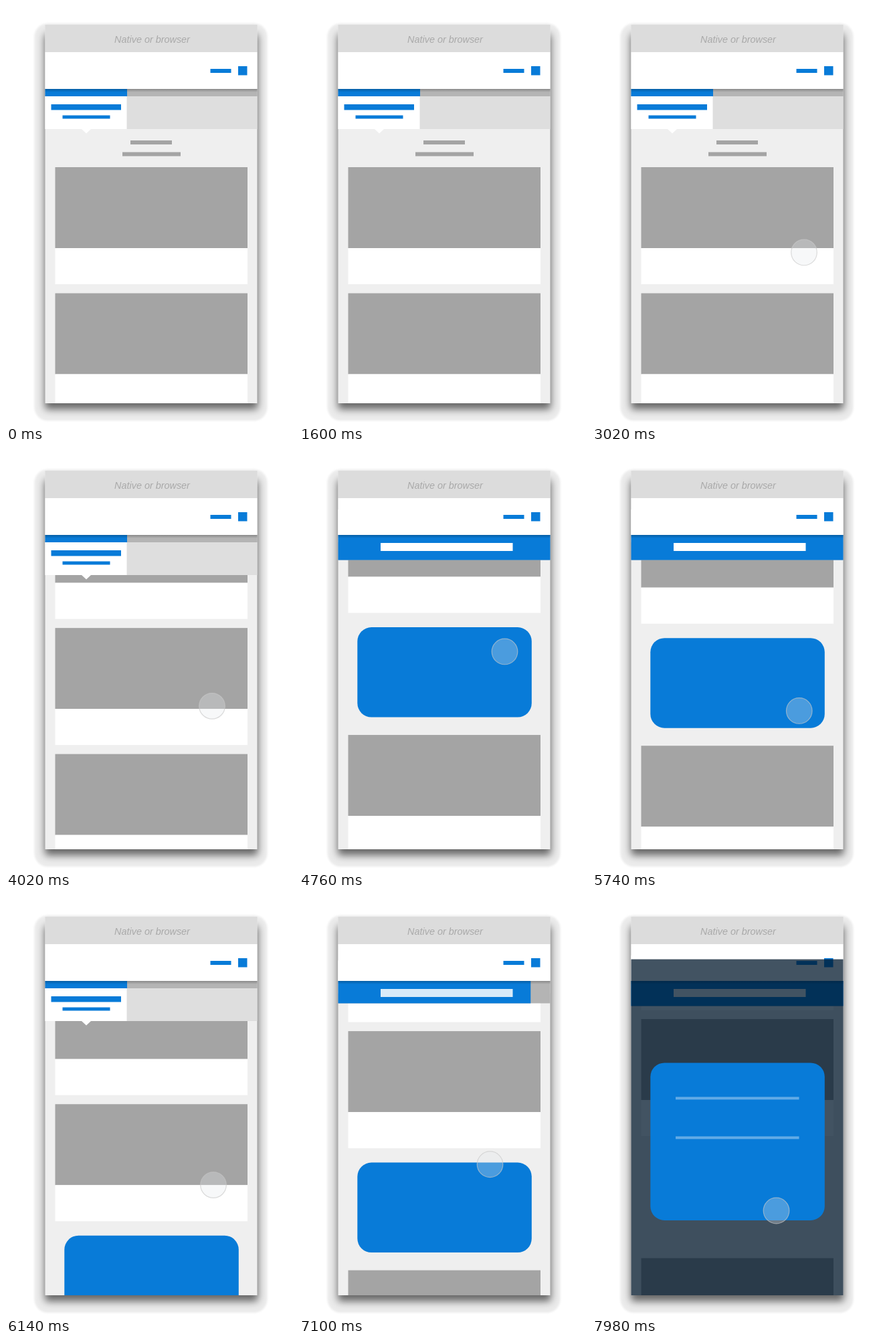
Write an HTML page that moves like this. It is 429x625 px and loops after 8000 ms.

```html
<!DOCTYPE html>
<html lang="en">
<head>
<meta charset="utf-8">
<title>Collapsing tabs</title>
<style>
  html, body { margin: 0; width: 100%; height: 100%; overflow: hidden; background: #fff; }
  svg { display: block; width: 100%; height: 100%; }
  text { font: italic 14.4px "Liberation Sans", Arial, sans-serif; fill: #a9a9a9; text-anchor: middle; }
  .blue { fill: #087bd8; }
  .grey { fill: #a4a4a4; }
  .white { fill: #fff; }
</style>
</head>
<body>
<svg viewBox="0 0 429 625">
  <defs>
    <filter id="soft" x="-20%" y="-20%" width="140%" height="140%"><feGaussianBlur stdDeviation="1.5"/></filter>
    <filter id="blur" x="-20%" y="-20%" width="140%" height="140%"><feGaussianBlur stdDeviation="6"/></filter>
    <linearGradient id="shade" x2="0" y2="1">
      <stop offset="0" stop-opacity=".24"/>
      <stop offset="1" stop-opacity="0"/>
    </linearGradient>
    <clipPath id="screen"><rect x="58.500" y="28" width="317" height="566"/></clipPath>
  </defs>

  <rect x="42.500" y="26" width="348" height="594" rx="20" fill="#ebebeb" filter="url(#soft)"/>
  <rect x="58" y="42" width="318.500" height="561" rx="4" opacity=".56" filter="url(#blur)"/>

  <g clip-path="url(#screen)">
    <rect x="58" y="28" width="318" height="566" fill="#efefef"/>
    <g id="page">
      <rect class="grey" x="186" y="201" width="62" height="6"/>
      <rect class="grey" x="174" y="218.500" width="87" height="6"/>
    </g>
    <g id="under"></g>

    <g id="tabs">
      <rect x="58" y="135" width="318" height="49" fill="#dedede"/>
      <path class="white" d="M58 135H180.500V184H127L120 190.500L113 184H58Z"/>
      <g id="label" class="blue">
        <rect x="67.500" y="147" width="104.500" height="8.500"/>
        <rect x="84.500" y="163.500" width="71" height="5"/>
      </g>
    </g>
    <rect id="strip" x="58" y="124" width="318" height="11" fill="#b4b4b4"/>
    <rect id="bar" class="blue" x="58" y="124" height="11"/>
    <rect id="search" class="white" x="122" y="136" width="197.500" height="12"/>
    <rect x="58" y="124" width="318" height="5" fill="url(#shade)"/>

    <rect class="white" x="58" y="69" width="318" height="55"/>
    <rect class="blue" x="305.500" y="94" width="31" height="6"/>
    <rect class="blue" x="347" y="90" width="13.500" height="13.500"/>
    <rect x="58" y="28" width="318" height="41" fill="#dcdcdc"/>
    <text x="218.500" y="55">Native or browser</text>

    <rect id="veil" x="58" width="318" fill="#00182c" fill-opacity=".74"/>
    <g id="over"></g>
  </g>

  <circle id="touch" r="19.300" fill="#e4e8ec" fill-opacity=".3" stroke="#c8c8c8" stroke-opacity=".65" stroke-width="1.200"/>
</svg>
<script>
const LOOP = 8000, CARD_TOP = 814.5, TAP = 7640;
const $ = id => document.getElementById(id);
const clamp = v => Math.max(0, Math.min(1, v));

function make(parent, tag, attrs) {
  const el = document.createElementNS('http://www.w3.org/2000/svg', tag);
  parent.appendChild(el);
  return set(el, attrs);
}

function set(el, attrs) {
  for (const k in attrs) el.setAttribute(k, attrs[k]);
  return el;
}

// Smooth curve through [time, value] keys that never overshoots.
function track(keys) {
  const slope = i => (keys[i + 1][1] - keys[i][1]) / (keys[i + 1][0] - keys[i][0]);
  const tangent = keys.map((_, i) => {
    if (!i || i === keys.length - 1) return 0;
    const a = slope(i - 1), b = slope(i);
    return a * b > 0 ? 2 * a * b / (a + b) : 0;
  });
  return t => {
    if (t <= keys[0][0]) return keys[0][1];
    const i = keys.findIndex(k => k[0] > t) - 1;
    if (i < 0) return keys[keys.length - 1][1];
    const [t0, a] = keys[i], [t1, b] = keys[i + 1];
    const d = t1 - t0, u = (t - t0) / d, v = 1 - u;
    return a * v * v * (1 + 2 * u) + b * u * u * (3 - 2 * u)
      + d * u * v * (tangent[i] * v - tangent[i + 1] * u);
  };
}

const scroll = track([[3430, 0], [4020, 166], [4760, 552], [5200, 721],
  [5310, 732], [6140, 310], [6480, 252], [7250, 437]]);
const touchX = track([[2350, 330], [2600, 317], [3020, 317], [3600, 311],
  [4020, 308], [4760, 307.5], [5200, 309], [6140, 310], [6600, 306], [7450, 275.5]]);
const touchY = track([[2350, 441], [2600, 440], [3020, 368.5], [3200, 360],
  [3600, 428], [4020, 380], [4760, 298.5], [4950, 292], [5200, 317.5],
  [6140, 429], [6450, 445], [7050, 395], [7450, 467.5]]);

for (const y of [241, 429.5, 618, 975.5, 1164, 1352.5]) {
  make($('page'), 'rect', { class: 'grey', x: 73.5, y, width: 287.5, height: 121 });
  make($('page'), 'rect', { class: 'white', x: 73.5, y: y + 121, width: 287.5, height: 54 });
}

const card = make($('under'), 'rect', { class: 'blue', x: 87.3, width: 260.5, rx: 21 });
const lines = [53, 112].map(dy => ({
  dy, el: make($('over'), 'rect', { x: 125, width: 184.5, height: 4, fill: '#62abe6' })
}));

function draw(t) {
  const s = scroll(t);
  const fold = clamp((s - 385) / 40);
  const open = 1 - (1 - clamp((t - TAP) / 525)) ** 3;

  set($('page'), { transform: `translate(0 ${-s})` });
  set($('tabs'), { transform: `translate(0 ${-49 * fold})` });
  set($('label'), { opacity: 1 - fold });
  set($('strip'), { height: 11 + 26.5 * fold });
  set($('bar'), { width: 123 + 195 * fold, height: 11 + 26.5 * fold });
  set($('search'), { opacity: fold });

  // The card lifts above the veil once tapped.
  const home = $(open > 0 ? 'over' : 'under');
  if (card.parentNode !== home) home.prepend(card);
  const top = CARD_TOP - s - 137 * open;
  set(card, { y: top, height: 134.5 + 105.6 * open });
  for (const { dy, el } of lines) set(el, { y: top + dy - 2, opacity: clamp(open * 2 - 0.8) });
  set($('veil'), { y: 594 - 525 * open, height: 525 * open });

  set($('touch'), { cx: touchX(t), cy: touchY(t), opacity: clamp((t - 2350) / 200) });
}

const start = performance.now();
function tick() {
  draw((performance.now() - start) % LOOP);
  requestAnimationFrame(tick);
}
tick();
</script>
</body>
</html>
```
